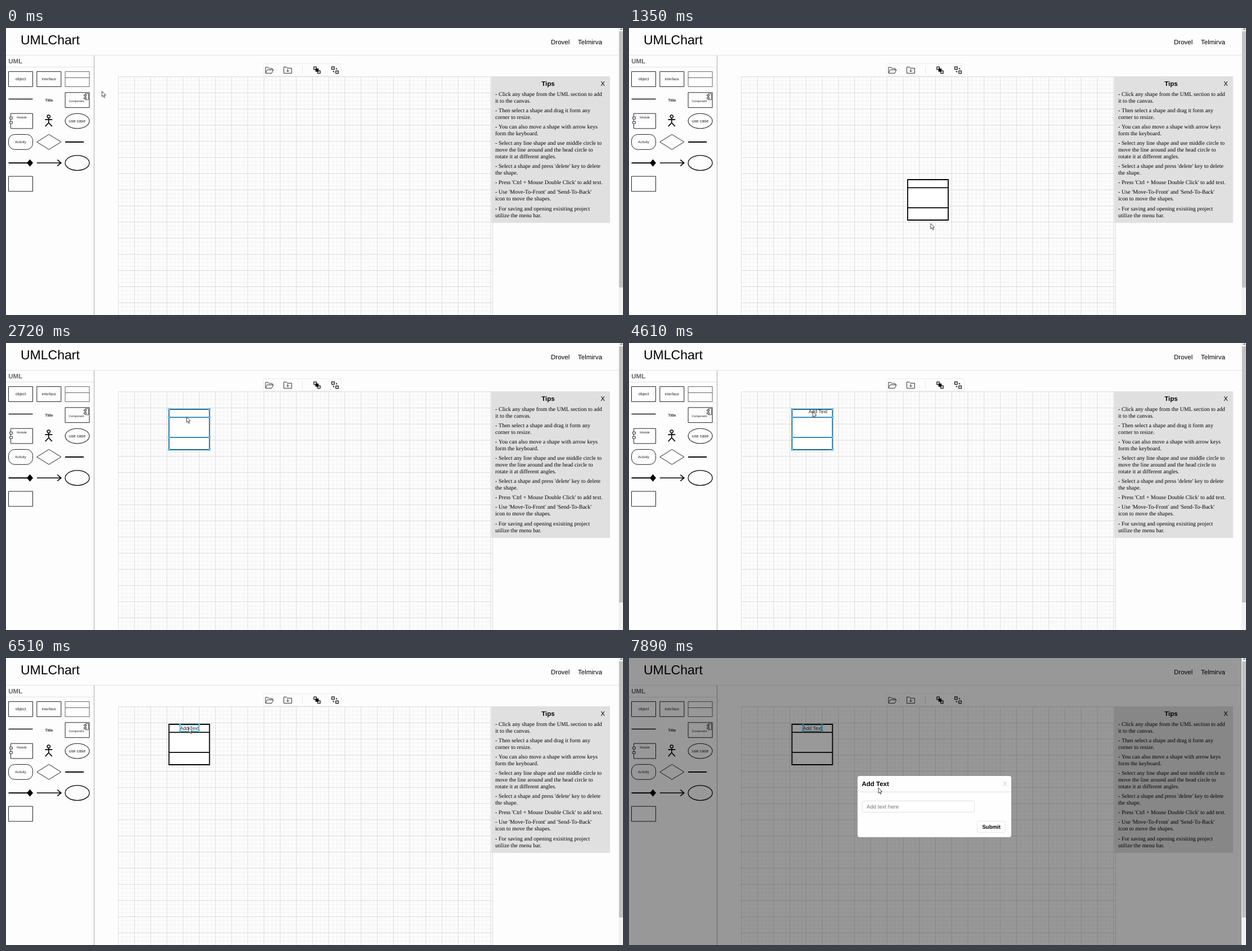
Recreate the animation shown at these times as an HTML page with a canvas. Size 1096 by 511 pixels, loop 8 s.

```html
<!DOCTYPE html>
<html lang="en">
<head>
<meta charset="utf-8">
<title>UMLChart</title>
<style>
html, body { margin: 0; width: 100%; height: 100%; overflow: hidden; background: #fdfdfd; }
canvas { display: block; }
</style>
</head>
<body>
<canvas id="stage" width="1096" height="511"></canvas>
<script>
const LOOP = 8000;
const TICK = 171.5; // the picture advances in even ticks
const SANS = '"Liberation Sans", Arial, sans-serif';
const SERIF = '"Liberation Serif", "Times New Roman", serif';
const BLUE = '#0a9be8';
const INK = '#222';
const view = document.getElementById('stage').getContext('2d');
let ctx = view;

const HOME = { x: 170.5, y: 112.5 };
// Eased pointer moves between two ticks
const MOVES = [
  { from: 0, to: 2, x: 134, y: 97 },
  { from: 4, to: 8, x: 536, y: 348 },
  { from: 8, to: 12, x: 530, y: 306.5 },
  { from: 12, to: 13, x: 323, y: 154 },
  { from: 13, to: 16, x: 320, y: 124 },
  { from: 26, to: 28, x: 333, y: 120 },
  { from: 30, to: 33, x: 324.5, y: 123.5 },
  { from: 44, to: 46, x: 443, y: 231 }
];
const PRESSES = [[3, 4], [12, 14], [30, 34], [35, 38]];
const AT = { create: 4, select: 12, drop: 13, label: 21, drag: 30, release: 33, modal: 43 };

const TIPS = [
  ['Click any shape from the UML section to add', 'it to the canvas.'],
  ['Then select a shape and drag it form any', 'corner to resize.'],
  ['You can also move a shape with arrow keys', 'form the keyboard.'],
  ['Select any line shape and use middle circle to', 'move the line around and the head circle to', 'rotate it at different angles.'],
  ["Select a shape and press 'delete' key to delete", 'the shape.'],
  ["Press 'Ctrl + Mouse Double Click' to add text."],
  ["Use 'Move-To-Front' and 'Send-To-Back'", 'icon to move the shapes.'],
  ['For saving and opening exisiting project', 'utilize the menu bar.']
];

function ease(now, from, to) {
  const p = Math.min(1, Math.max(0, (now - from) / (to - from)));
  return p * p * (3 - 2 * p);
}

function text(str, x, y, size, { color = '#000', weight = '', align = 'left', family = SANS } = {}) {
  ctx.font = `${weight} ${size}px ${family}`;
  ctx.textRendering = 'geometricPrecision';
  ctx.fillStyle = color;
  ctx.textAlign = align;
  ctx.fillText(str, x, y);
}

function draw(shape, stroke, width = 1, fill) {
  if (fill) { ctx.fillStyle = fill; ctx.fill(shape); }
  if (stroke) { ctx.strokeStyle = stroke; ctx.lineWidth = width; ctx.stroke(shape); }
}

const path = (d, ...style) => draw(new Path2D(d), ...style);
const line = (x1, y1, x2, y2, ...style) => path(`M${x1} ${y1}L${x2} ${y2}`, ...style);

function box(x, y, w, h, stroke, width, fill, radius = 0) {
  const shape = new Path2D();
  shape.roundRect(x, y, w, h, radius);
  draw(shape, stroke, width, fill);
}

function ellipse(x, y, rx, ry, ...style) {
  const shape = new Path2D();
  shape.ellipse(x, y, rx, ry, 0, 0, Math.PI * 2);
  draw(shape, ...style);
}

const fillBox = (x, y, w, h, fill, radius) => box(x, y, w, h, null, 0, fill, radius);

function at(x, y, paint) {
  ctx.save();
  ctx.translate(x, y);
  paint();
  ctx.restore();
}

// Palette thumbnails, each drawn around its cell's centre
const W = 21.5, H = 13.4;
const frame = (color = INK) => box(-W, -H, 2 * W, 2 * H, color);
const caption = (str, size, x = 0, y = 0, weight = '') =>
  text(str, x, y + size * .35, size, { align: 'center', color: INK, weight });

function tabs(x, y, gap, w, h) {
  for (const top of [y, y + gap]) box(x, top, w, h, INK, .9, '#fff');
}

const THUMBNAILS = [
  () => { frame(); caption('object', 7); },
  () => { frame(); caption('interface', 6.6); },
  () => { frame('#666'); line(-W, -2.5, W, -2.5, '#666'); },
  () => line(-W, -1.8, W, -1.8, '#111', 1.3),
  () => caption('Title', 6.8, 0, 0, 'bold'),
  () => {
    frame();
    box(14.5, -11.5, 5.5, 11, INK, .8);
    tabs(12, -9.5, 5, 4, 2.3);
    caption('Component', 5.3, -1.5, 1.5);
  },
  () => { box(-17.5, -H, W + 17.5, 2 * H, INK); tabs(-19.5, -7, 8, 5, 3.5); caption('Module', 5.4, 2, -6.5); },
  () => {
    ellipse(-.5, -8, 2.7, 2.7, '#000', 1.5);
    path('M-.5 -5.5V3M-7 -2.5H6M-6.5 9.5L-.5 3L5.5 9.5', '#000', 1.6);
  },
  () => { ellipse(0, 0, W, H, INK, 1.1); caption('use case', 7.4); },
  () => { box(-W, -H, 2 * W, 2 * H, INK, 1, null, 11); caption('Activity', 6.3); },
  () => path(`M${-W} 0L0 ${-H}L${W} 0L0 ${H}Z`, INK),
  () => line(-W, 0, 11.5, 0, '#000', 2),
  () => { line(-W, 0, W - 8, 0, '#000', 2); path('M11 0L16.5 -6.5L22 0L16.5 6.5Z', null, 0, '#000'); },
  () => path(`M${-W} 0H${W}M15 -5.5L${W} 0L15 5.5`, '#000', 1.6),
  () => ellipse(0, 0, W, H, '#000', 1.3),
  () => frame()
];

function drawPalette() {
  THUMBNAILS.forEach((paint, i) => at(26 + 50.3 * (i % 3), 91 + 37.3 * Math.floor(i / 3), paint));
}

function drawGrid() {
  const left = 199.5, top = 86.8, right = 864.5, bottom = 511, step = 28.75;
  const rules = (gap, color) => {
    for (let x = left; x <= right; x += gap) line(x, top, x, bottom, color);
    for (let y = top; y < bottom; y += gap) line(left, y, right, y, color);
  };
  rules(step / 4, '#f3f3f3');
  rules(step, '#dedede');
  line(right, top, right, bottom, '#dedede');
}

function cornerSquares(gap) {
  for (const c of [-gap, gap]) box(c - 2.2, c - 2.2, 4.4, 4.4, '#111', 1.3);
}

function drawToolbar() {
  box(457.5, 63.5, 138, 22, '#ececec', 1, '#fdfdfd', 2);
  at(468, 75, () => path('M-7 5V-5H-3L-1 -3H5V-.5M-7 5L-4 -.5H7L4 5.5H-7', '#333'));
  at(500.5, 75, () => path('M-7 5.5V-5.5H-2.5L-1 -3.5H7V5.5ZM0 -2V3M-2.5 .5L0 3L2.5 .5', '#333'));
  line(526.5, 68, 526.5, 81, '#e2e2e2');
  at(552.5, 75, () => { cornerSquares(3.4); fillBox(-2.8, -2.8, 5.6, 5.6, '#000'); });
  at(584.5, 75, () => { cornerSquares(3.6); path('M1 -3H3V-1M-1 3H-3V1', '#111', 1.2); });
}

function drawTips() {
  fillBox(862, 86, 211, 261, '#e0e0e0', 1);
  text('Tips', 963, 103.3, 11.5, { weight: 'bold', align: 'center' });
  text('X', 1060, 103.3, 11.5, { align: 'center' });
  const size = 10.06, left = 869;
  let y = 120.5;
  for (const tip of TIPS) {
    text('-', left, y, size, { family: SERIF, weight: 'bold' });
    tip.forEach((str, i) => text(str, i ? left : left + 6, y + 12 * i, size, { family: SERIF }));
    y += 12 * tip.length + 5.15;
  }
}

function drawPage() {
  fillBox(0, 0, 1096, 511, '#fdfdfd');
  text('UMLChart', 26, 28.5, 23);
  text('Drovel', 968, 28.5, 11.5);
  text('Telmirva', 1016, 28.5, 11.5);
  line(0, 48.5, 1088, 48.5, '#e2e2e2');
  text('UML', 4.3, 63.2, 11.5, { weight: 'bold', color: '#666' });
  line(0, 69.5, 156, 69.5, '#e2e2e2');
  line(156.5, 49, 156.5, 511, '#a8a8a8');
  drawPalette();
  drawToolbar();
  drawGrid();
  drawTips();
}

function drawScrollbar() {
  fillBox(1088, 0, 8, 511, '#f1f1f1');
  fillBox(1089, 6, 7, 456, '#c1c1c1');
  path('M1090.5 3L1093 .5L1095.5 3Z', null, 0, '#777');
}

const handle = (x, y) => box(x - 1.3, y - 1.3, 2.6, 2.6, BLUE, .9, '#fff');

function drawClass(x, y, selected) {
  const size = 72, rows = [0, 14.4, 50.2, size];
  box(x, y, size, size, selected ? '#146690' : '#000', 1.8, '#fff');
  rows.slice(1, 3).forEach(r => line(x, y + r, x + size, y + r, selected ? '#1a7aae' : '#000', 1.8));
  if (selected) rows.forEach(r => { handle(x, y + r); handle(x + size, y + r); });
}

function drawLabel(x, y, selected) {
  text('Add Text', x, y, 8.65, { color: INK });
  if (!selected) return;
  const right = x + 34, top = y - 8.5, bottom = y + 2.7;
  box(x, top, right - x, bottom - top, BLUE);
  for (const hx of [x, right]) for (const hy of [top, bottom]) handle(hx, hy);
}

function drawModal() {
  fillBox(0, 0, 1088, 511, 'rgba(0,0,0,.4)');
  fillBox(406, 210, 273, 109, '#fefefe', 4);
  text('Add Text', 413.5, 228, 11.5, { weight: 'bold' });
  text('X', 668, 228, 11.5, { align: 'center', color: '#ccc' });
  line(406, 238.5, 679, 238.5, '#e0e0e0');
  box(414.5, 254.5, 199, 20, '#dfdfdf', 1, '#fff', 3);
  text('Add text here', 422, 267.8, 9.6, { color: '#757575' });
  box(618.5, 290.5, 49.5, 20, '#e6e6e6', 1, '#fdfdfd', 3);
  text('Submit', 643.7, 303.5, 9.6, { weight: 'bold', align: 'center' });
}

function pointerAt(tick) {
  return MOVES.reduce((p, move) => {
    const k = ease(tick, move.from, move.to);
    return { x: p.x + (move.x - p.x) * k, y: p.y + (move.y - p.y) * k };
  }, HOME);
}

function drawPointer(tick) {
  const { x, y } = pointerAt(tick);
  if (PRESSES.some(([down, up]) => tick >= down && tick < up)) {
    ellipse(x - .5, y, 8.7, 8.7, null, 0, 'rgba(252,240,40,.75)');
  }
  at(x, y, () => path('M0 0V9.6L2.2 7.8L3.7 11.3L5.2 10.6L3.7 7.2L6.6 7Z', '#333', .9, '#fff'));
}

const page = document.createElement('canvas');
page.width = 1096;
page.height = 511;
ctx = page.getContext('2d');
drawPage();
ctx = view;

function render() {
  const tick = Math.floor((performance.now() % LOOP + 22) / TICK);
  ctx.drawImage(page, 0, 0);
  if (tick >= AT.create) {
    const dropped = tick >= AT.drop;
    drawClass(dropped ? 289.5 : 495, dropped ? 118 : 270, tick >= AT.select && tick < AT.drag);
  }
  if (tick >= AT.label) {
    const k = ease(tick, AT.drag, AT.release);
    drawLabel(319 - 10 * k, 124.7 + 3 * k, tick >= AT.drag);
  }
  if (tick >= AT.modal) drawModal();
  drawScrollbar();
  drawPointer(tick);
  requestAnimationFrame(render);
}
render();
</script>
</body>
</html>
```
